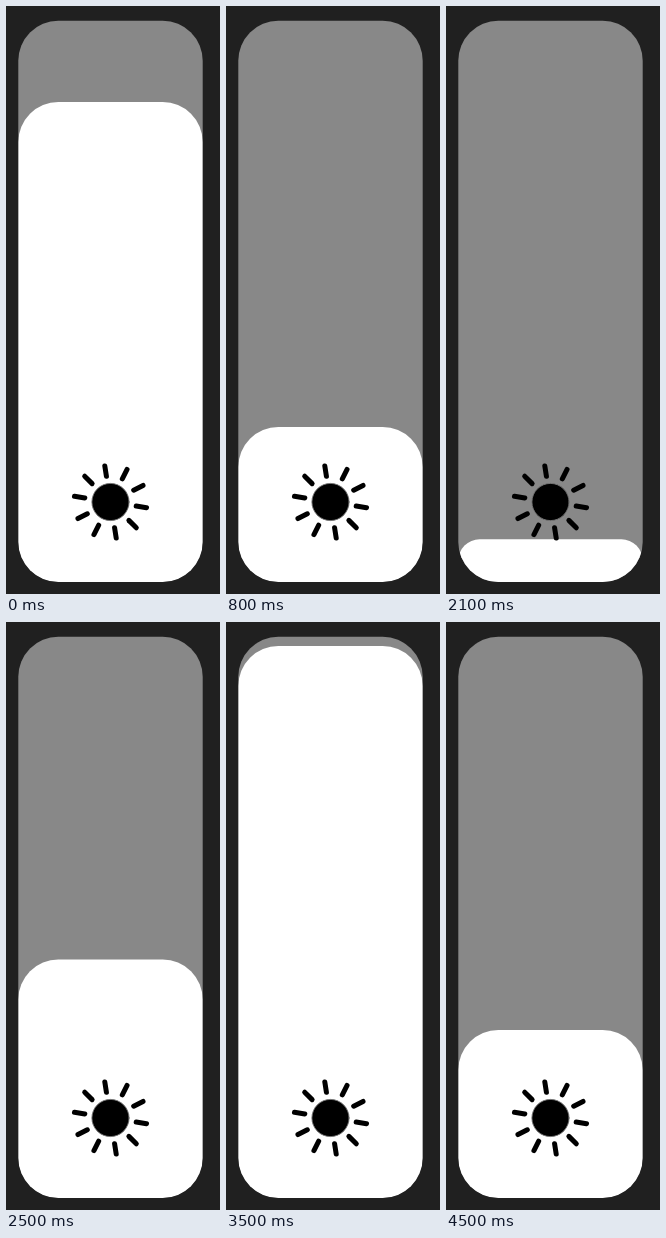
An HTML page for the animation above (4.7 s loop, 214 px wide and 588 px high).

```html
<!DOCTYPE html>
<html lang="en">
<head>
<meta charset="utf-8">
<title>Brightness slider</title>
<style>
  html, body { margin: 0; height: 100%; overflow: hidden; background: #202020; }
  svg { display: block; filter: blur(0.35px); }
</style>
</head>
<body>
<svg width="214" height="588">
  <clipPath id="shape"><rect x="12.3" y="14.8" width="184.4" height="561.2" rx="40"/></clipPath>
  <g clip-path="url(#shape)">
    <rect width="214" height="588" fill="#888"/>
    <rect id="fill" x="12.3" width="184.4" fill="#fff"/>
  </g>
  <g id="sun" transform="translate(104.5 496)" stroke="#000" stroke-width="5" stroke-linecap="round">
    <circle r="18.6" stroke="#777" stroke-width="0.9"/>
  </g>
</svg>
<script>
const LOOP = 4700, STEP = 100, BOTTOM = 576, RADIUS = 40;
const RAYS = 10, RAY_OFFSET = -9;

// Where the drag turns, rests or changes pace: [time in ms, y of the fill's top edge]
const keys = [
  [400, 96], [800, 421], [1400, 536], [1700, BOTTOM], [2000, BOTTOM], [2400, 303], [2600, 372],
  [3000, 72], [3100, 101], [3600, 15], [4000, 15], [4100, 70], [4500, 408]
];

const slope = ([t0, y0], [t1, y1]) => (y1 - y0) / (t1 - t0);

// Tangent at a key: flat where the drag turns or rests, else the harmonic mean of both slopes
function tangent(i) {
  if (i === 0 || i === keys.length - 1) return 0;
  const before = slope(keys[i - 1], keys[i]), after = slope(keys[i], keys[i + 1]);
  return before * after > 0 ? 2 * before * after / (before + after) : 0;
}

function levelAt(time) {
  const next = keys.findIndex(([t]) => t > time);
  if (next === 0) return keys[0][1];
  if (next < 0) return keys[keys.length - 1][1];
  const [t0, y0] = keys[next - 1], [t1, y1] = keys[next];
  const span = t1 - t0, u = (time - t0) / span, v = 1 - u;
  return y0 + (y1 - y0) * u * u * (3 - 2 * u)
    + span * u * v * (v * tangent(next - 1) - u * tangent(next));
}

const sun = document.getElementById('sun');
for (let i = 0; i < RAYS; i++) {
  const ray = document.createElementNS(sun.namespaceURI, 'line');
  ray.setAttribute('y1', -26);
  ray.setAttribute('y2', -36.5);
  ray.setAttribute('transform', `rotate(${RAY_OFFSET + i * 360 / RAYS})`);
  sun.append(ray);
}

const fill = document.getElementById('fill');
function draw() {
  const time = performance.now() % LOOP;
  const top = levelAt(Math.floor(time / STEP) * STEP);
  const height = BOTTOM - top;
  fill.setAttribute('y', top);
  fill.setAttribute('height', height);
  fill.setAttribute('rx', Math.min(RADIUS, height / 2));
  requestAnimationFrame(draw);
}
draw();
</script>
</body>
</html>
```
